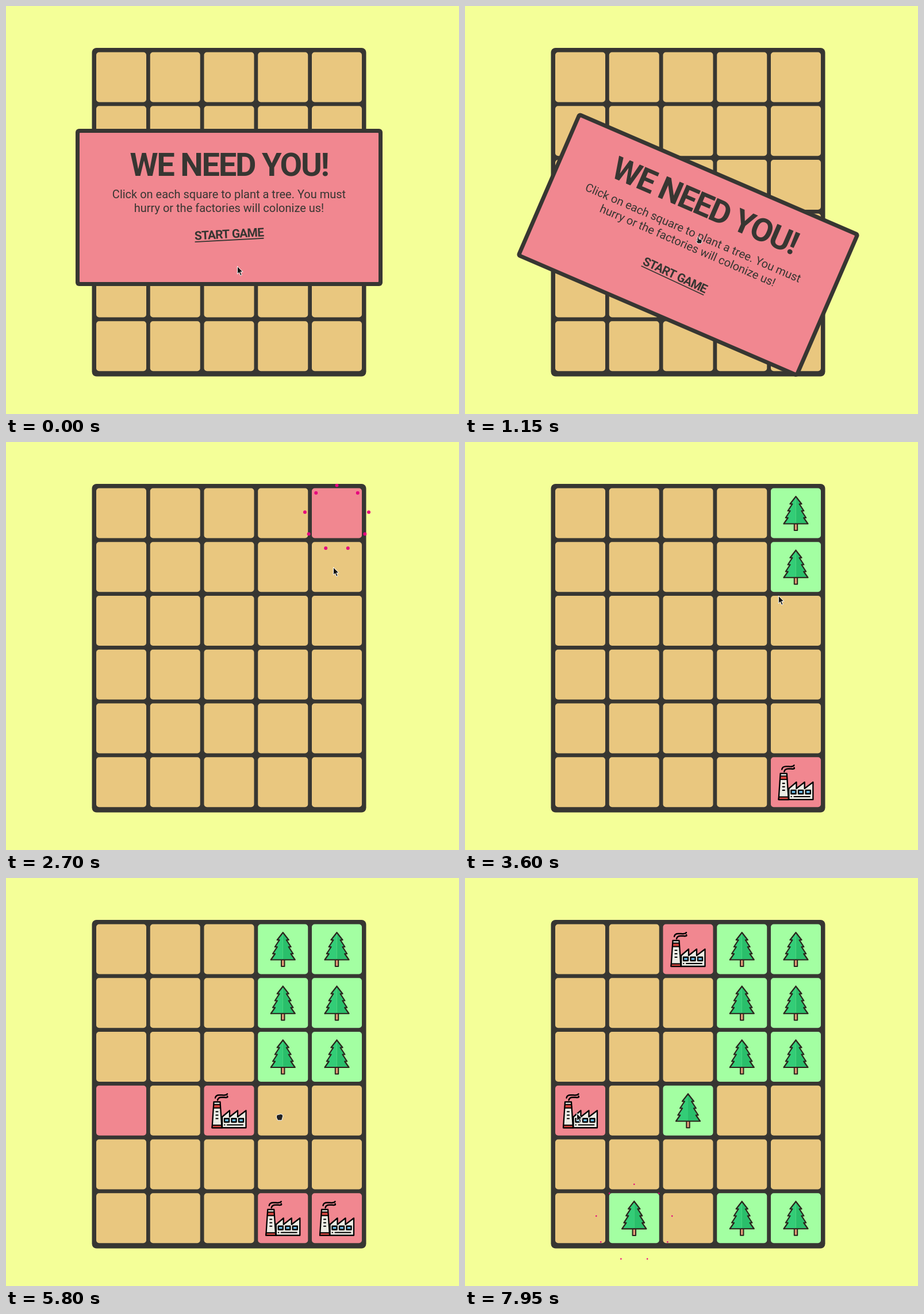
An HTML page with a canvas for the animation above (8 s loop, 788 by 711 pixels).

```html
<!DOCTYPE html>
<html lang="en">
<head>
<meta charset="utf-8">
<title>Plant the squares</title>
<style>
  html, body { margin: 0; width: 100%; height: 100%; overflow: hidden; background: #f4ff98; }
  canvas { display: block; }
</style>
</head>
<body>
<canvas id="stage" width="788" height="711"></canvas>
<script>
const ctx = document.getElementById('stage').getContext('2d');
const LOOP = 8000, ICON_TIME = 300, BURST_TIME = 1000, FACTORY_DELAY = 140;
const BG = '#f4ff98', INK = '#373632', TAN = '#e9c77f', PINK = '#f18790', GREEN = '#a3ffa2', DOT = '#e6007e';
const FONT = 'Roboto, sans-serif';

// Cells are named by column letter and row number.
const factoryOrder = ['E1', 'E6', 'C4', 'D6', 'A4', 'B6', 'C1'];
const pinkTime = k => 2350 + 840 * k;
const clicks = {
  E1: 2500, E2: 2850, D1: 4126, D2: 4363, E3: 4720,
  D3: 5100, D6: 6310, E6: 6610, C4: 6980, B6: 7628
};

const cells = [];
for (let row = 0; row < 6; row++) {
  for (let col = 0; col < 5; col++) {
    const name = 'ABCDE'[col] + (row + 1);
    const turn = factoryOrder.indexOf(name);
    const pink = turn < 0 ? Infinity : pinkTime(turn);
    const hit = clicks[name] ?? Infinity;
    // The first cell is hit before its factory has appeared, so its tree waits longer.
    const treeDelay = hit - pink < FACTORY_DELAY + 100 ? 220 : turn < 0 ? 130 : 45;
    cells.push({ name, pink, hit, tree: hit + treeDelay, x: 200.5 + 93.75 * col, y: 124 + 93.75 * row });
  }
}

// The pointer leaves each stop at its time and reaches the next one a little early.
const stopAt = (name, time) => {
  const { x, y } = cells.find(c => c.name === name);
  return { time, x: x - 6, y: y + 5 };
};
const stops = [
  { time: 0, x: 402.5, y: 454 },
  { time: 1150, x: 406, y: 402 },
  { time: 1750, x: 403, y: 430 },
  ...Object.entries(clicks).map(([name, time]) => stopAt(name, time)),
  stopAt('E3', 3400), stopAt('D4', 5850), stopAt('A4', LOOP)
].sort((a, b) => a.time - b.time);

const clamp = v => Math.max(0, Math.min(1, v));
const backOut = p => 1 + 2.70158 * (p - 1) ** 3 + 1.70158 * (p - 1) ** 2;
const expoOut = p => 1 - 2 ** (-10 * p);
const smooth = p => p * p * (3 - 2 * p);
const mix = (a, b, p) => a + (b - a) * p;

function place(x, y, angle, scale, draw) {
  ctx.save();
  ctx.translate(x, y);
  ctx.rotate(angle);
  ctx.scale(scale, scale);
  draw();
  ctx.restore();
}

function box(x, y, w, h, radius, color) {
  ctx.fillStyle = color;
  ctx.beginPath();
  ctx.roundRect(x, y, w, h, radius);
  ctx.fill();
}

function shape(path, fill, stroke, width) {
  const p = new Path2D(path);
  ctx.lineWidth = width;
  ctx.lineJoin = ctx.lineCap = 'round';
  if (fill) { ctx.fillStyle = fill; ctx.fill(p); }
  if (stroke) { ctx.strokeStyle = stroke; ctx.stroke(p); }
}

function text(str, y, size, weight, spacing) {
  ctx.font = `${weight} ${size}px ${FONT}`;
  ctx.letterSpacing = spacing * size + 'px';
  ctx.textAlign = 'center';
  ctx.fillStyle = INK;
  ctx.fillText(str, 0, y);
}

function drawTree() {
  const line = '#2b241c';
  const side = s => [1, 2, 3].map(i => `L${s * (6.3 + 3.8 * i)} ${12 * i - 28}h${-s * 4}`).join('') + `L${s * 21} 18.5`;
  shape('M-2.7 18H2.7V30H-2.7Z', '#e59b78', line, 2);
  shape(`M0-29${side(1)}H0Z`, '#2abf6b');
  shape(`M0-29${side(-1)}H0Z`, '#33cd77');
  shape(`M0-29${side(1)}H-21M0-29${side(-1)}`, null, line, 2.2);
}

function drawFactory() {
  shape('M-12 11L1 0V11L15 0V11L29.5 0V30H-12Z', '#ecebe4', '#000', 2.3);
  shape('M-26.5-15H-15.5L-12.5 30H-29.5Z', '#ecebe4', '#000', 2.3);
  shape('M-26.5-10.5H-15.5L-15-4.5H-27Z', '#d4463f', '#000', 1.8);
  shape('M-29 25.5H-13L-12.5 30H-29.5Z', '#d4463f', '#000', 2);
  for (const y of [2, 8, 14]) shape(`M-22.5 ${y}h3`, null, '#000', 2.2);
  for (const x of [-8, 4.5, 17]) shape(`M${x} 14h8v6h-8Z`, '#6cb9e2', '#000', 2.3);
  shape('M-8 25h.5M-3 25H24', null, '#000', 2);
  for (const x of [0, 4]) shape(`M${x - 24} ${x - 22}q1-5 7-5h5q7 1 ${9 - x}-2`, null, '#000', 2.4);
}

function drawIcon(cell, t) {
  const grown = t >= cell.tree;
  const start = grown ? cell.tree : cell.pink + FACTORY_DELAY;
  if (t < start || (!grown && t >= cell.hit)) return;
  const scale = Math.max(0, backOut(clamp((t - start) / ICON_TIME)));
  place(cell.x, cell.y, 0, scale, grown ? drawTree : drawFactory);
}

function drawBurst(cell, t) {
  if (t < cell.hit || t > cell.hit + BURST_TIME) return;
  const p = expoOut((t - cell.hit) / BURST_TIME);
  ctx.fillStyle = DOT;
  for (let i = 0; i < 9; i++) {
    const a = i * Math.PI * 2 / 9;
    ctx.beginPath();
    ctx.arc(cell.x + 75 * p * Math.sin(a), cell.y + 8 - 75 * p * Math.cos(a), 12 * (1 - p), 0, Math.PI * 2);
    ctx.fill();
  }
}

function drawBoard(t) {
  box(149.5, 73, 477, 572.5, 8, INK);
  for (const cell of cells) {
    const color = t >= cell.tree ? GREEN : t >= cell.pink ? PINK : TAN;
    box(cell.x - 43.5, cell.y - 43.5, 87, 87, 5, color);
  }
  for (const cell of cells) drawIcon(cell, t);
  for (const cell of cells) drawBurst(cell, t);
}

function drawDialog(t) {
  const fall = Math.max(0, (t - 1000) / 510) ** 2;
  if (fall > 1) return;
  place(388, 351 + 745 * fall, 4.65 * fall, 1, () => {
    box(-267, -137, 534, 274, 6, INK);
    box(-260, -130, 520, 260, 1, PINK);
    text('WE NEED YOU!', -55.5, 56, 700, -0.04);
    text('Click on each square to plant a tree. You must', -16, 20, 400, 0);
    text('hurry or the factories will colonize us!', 8, 20, 400, 0);
    const sway = (1 - Math.cos(Math.PI * t / 875)) / 2;
    place(0, 47 + 14 * sway, mix(-3, 3, sway) * Math.PI / 180, 1, () => {
      text('START GAME', 6.5, 21, 700, -0.04);
      ctx.fillRect(-60, 9, 120, 1.8);
    });
  });
}

function drawCursor(t) {
  const i = stops.findIndex(s => s.time > t);
  const from = stops[i - 1], to = stops[i];
  const p = smooth(clamp((t - from.time) / (to.time - from.time - 120)));
  place(mix(from.x, to.x, p), mix(from.y, to.y, p), 0, 1, () => {
    if (t >= 950 && t < 1400) {
      shape('M-2 7V1Q0-1 1 1V4L5 5Q7 6 6 9L5 12H-1L-4 8Q-4 6-2 7Z', '#222', '#fff', 1);
    } else if (t >= 5700 && t < 5900) {
      shape('M-5 4Q-3 1-1 2Q2 0 5 2Q7 4 5 8L4 12H-3L-5 8Z', '#222', '#fff', 1);
    } else {
      shape('M0 0V13L3 10.3 5.3 15.7 7.7 14.7 5.4 9.4H9.2Z', '#111', '#fff', 1);
    }
  });
}

function frame(now) {
  const t = now % LOOP;
  ctx.fillStyle = BG;
  ctx.fillRect(0, 0, 788, 711);
  drawBoard(t);
  drawDialog(t);
  drawCursor(t);
  requestAnimationFrame(frame);
}

requestAnimationFrame(frame);
</script>
</body>
</html>
```
